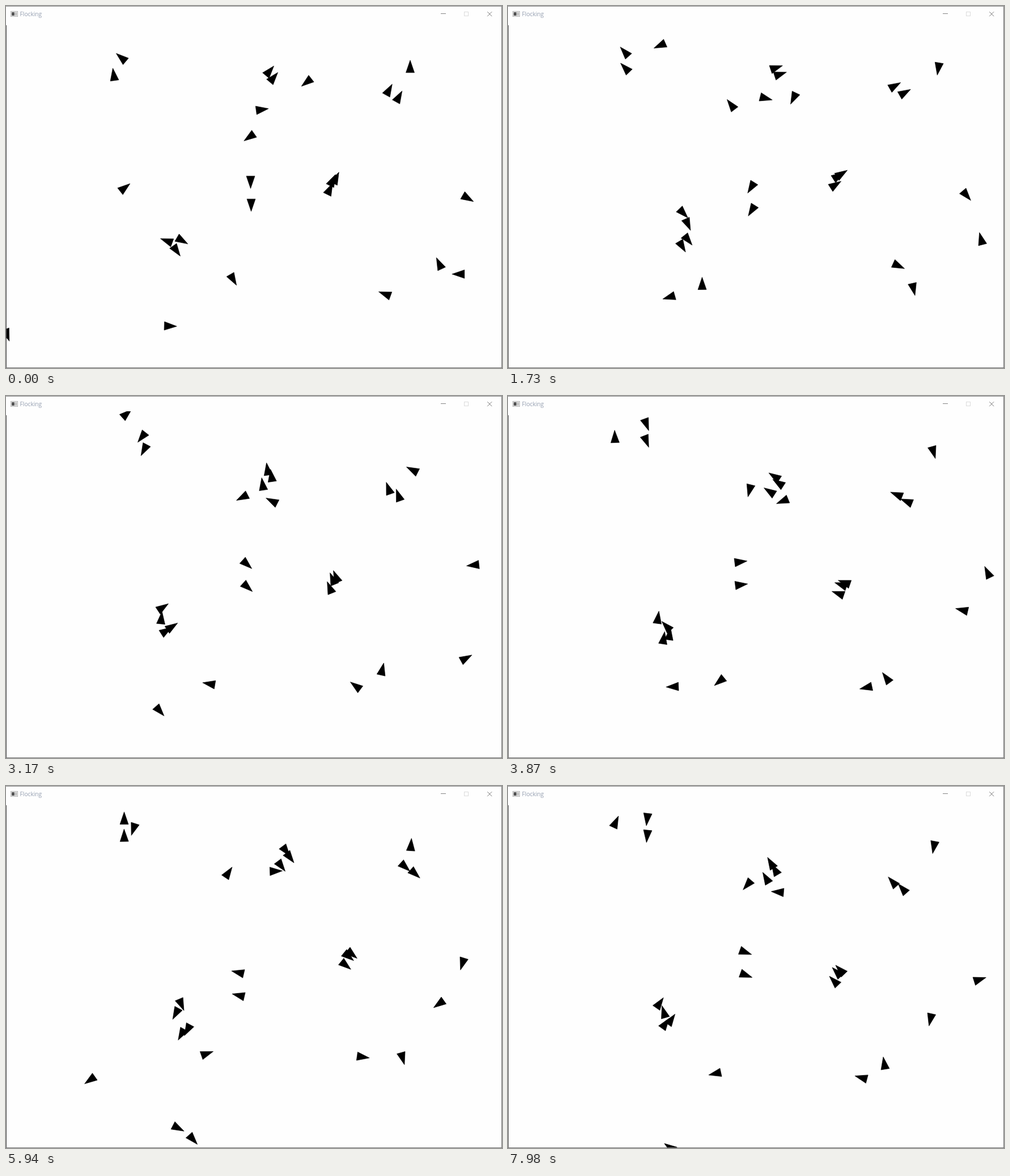
An HTML page for the animation above (8000 ms loop, 875 by 640 pixels).

```html
<!DOCTYPE html>
<html lang="en">
<head>
<meta charset="utf-8">
<title>Flocking</title>
<style>
  html, body { margin: 0; width: 100%; height: 100%; overflow: hidden; background: #fefefe; }
  svg { display: block; width: 875px; height: 640px; }
  text { font: 10.2px "Open Sans", "Noto Sans", sans-serif; fill: #929cae; }
</style>
</head>
<body>
<svg viewBox="0 0 875 640">
  <defs><clipPath id="view"><rect x="1" y="27" width="873" height="612"/></clipPath></defs>
  <rect width="875" height="640" fill="#fefefe"/>
  <g id="flock" clip-path="url(#view)" stroke="#000" stroke-width=".6"></g>
  <g fill="none" shape-rendering="crispEdges">
    <path d="M0 .5H875" stroke="#8a8a8a"/>
    <path d="M.5 34V640" stroke="#4c4c4c"/>
    <path d="M874.5 1V640M0 639.5H875" stroke="#767676"/>
    <path d="M767 13.5H776" stroke="#858585"/>
    <rect x="808.5" y="10.5" width="7" height="7" stroke="#dcdcdc"/>
    <rect x="8.5" y="9.5" width="12" height="9" stroke="#b4b4b4" fill="#eee"/>
    <rect x="10" y="11" width="5" height="6" fill="#555"/>
    <rect x="16" y="11" width="3" height="6" fill="#bbb"/>
  </g>
  <path d="M849.2 10.2l8 8m0-8l-8 8" stroke="#7c7c7c" fill="none"/>
  <text x="24.6" y="17.8">Flocking</text>
</svg>
<script>
const LOOP = 8000, START = 40;
const SPEED = 0.148;                // px per ms
const RADIUS = 18.5, RATE = 0.4445; // shared circle, degrees per ms
const DEG = Math.PI / 180;

// Moments at which a boid may change its course
const TIMES = [START, 1020, 2450, 3870, 4730, 5940, 7980];

// Headings run clockwise from north; a negative radius circles to the left
const orbit = (x, y, h, r) =>
  ({ x: x - r * Math.cos(h * DEG), y: y - r * Math.sin(h * DEG), h });

const mix = (a, b, k) => a + (b - a) * k;

const circle = (x, y, h, r = RADIUS, rate = RATE) =>
  t => orbit(x, y, h + rate * (t - START), r);

// A steady turn around a drifting centre, from one pose to the next
function swerve(a, b, t) {
  const span = b.t - a.t, k = (t - a.t) / span;
  const r = SPEED * span / ((b.h - a.h || 1) * DEG);
  const c = orbit(a.x, a.y, a.h, -r), d = orbit(b.x, b.y, b.h, -r);
  return orbit(mix(c.x, d.x, k), mix(c.y, d.y, k), mix(a.h, b.h, k), r);
}

function follow(keys, t) {
  const i = keys.findIndex(k => k.t > t);
  return i === 0 ? keys[0] : i < 0 ? keys[keys.length - 1] : swerve(keys[i - 1], keys[i], t);
}

const poses = (list, first = 0) =>
  list.map(([x, y, h], i) => ({ t: TIMES[first + i], x, y, h }));

const moment = (motion, i) => ({ t: TIMES[i], ...motion(TIMES[i]) });

// Boids that circle in step
const flock = (h, ...centres) => centres.map(([x, y]) => circle(x, y, h));

// Comes from elsewhere and settles into a circle
function join(home, arrival, ...list) {
  const keys = [...poses(list), moment(home, arrival)];
  return t => t < TIMES[arrival] ? follow(keys, t) : home(t);
}

// Breaks out of a circle
function leave(home, departure, ...list) {
  const keys = [moment(home, departure), ...poses(list, departure + 1)];
  return t => t < TIMES[departure] ? home(t) : follow(keys, t);
}

// Roams through poses, from the given moment on
function roam(first, ...list) {
  const keys = poses(list, first);
  return t => follow(keys, t);
}

const boids = [
  ...flock(180, [413, 311.5], [414, 352]),
  ...flock(26, [588, 331.5], [599, 312], [593, 316]),
  ...flock(29, [692, 157], [709.5, 169]),
  ...flock(40, [479.5, 126.5], [486.5, 138]),

  // alone
  circle(826, 321, 120, -22, -0.414),
  circle(603.5, -5, 556.6, -52, -0.182),
  circle(-45, 599, 160, 50, 0.15),

  // top left
  join(circle(207, 71, 95), 3, [235, -10, 405], [245, 34, 765], [245, 0, 1170]),
  join(circle(227, 57, -103), 3, [203, 91, -50]),
  join(circle(227, 87, -104), 2, [190, 121, -8]),

  // left
  join(circle(283, 394, 105), 3, [210, 321, 412], [319, 375, 540]),
  join(circle(292.5, 394, 54), 2, [283, 415, 290]),
  join(circle(293, 430.5, 106), 2, [301, 433, 145]),
  join(circle(303.5, 423, 105), 2, [311, 415, 120]),
  join(circle(361, 490.5, -32), 1, [401, 484, 150]),

  // top centre
  join(circle(471, 153, 40), 2, [530, 135, 592], [434, 126, 742]),
  join(circle(477, 169, -15), 2, [452, 183, 82], [429, 233, 595]),
  join(circle(408, 163, -69), 1, [429, 232, 235]),

  // right
  join(circle(733, 105, -99), 3, [713, 107, 360]),
  join(circle(682, 487, 61), 2, [764, 455, 695], [699, 468, 540]),
  join(circle(627.5, 497.5, -5), 2, [668, 509, 1010], [688, 529, 710]),
  join(circle(790, 423, 319, -46, -0.1973), 1, [798, 474, 270]),

  // bottom
  leave(circle(291, 540, 92, -26, -0.33), 4, [148, 520, -1565], [-40, 600, -1600]),
  roam(3, [275, 662, 0], [287, 587, 107], [304, 605, 477], [285, 638.5, 1025]),
  roam(0, [165, 672, -340], [197, 637, 20], [215, 675, 500], [235, 672, 930],
    [257, 633, 1130], [330, 625, 1578], [330, 680, 2300]),
];

const layer = document.getElementById("flock");
const shapes = boids.map(() => {
  const p = document.createElementNS("http://www.w3.org/2000/svg", "path");
  p.setAttribute("d", "M0-11.2L7.5 10.8H-7.5Z");
  return layer.appendChild(p);
});

function draw(time) {
  const t = Math.max(time % LOOP, START);
  boids.forEach((motion, i) => {
    const { x, y, h } = motion(t);
    shapes[i].setAttribute("transform",
      `translate(${x.toFixed(2)} ${y.toFixed(2)}) rotate(${h.toFixed(2)})`);
  });
}

const begin = performance.now();
function tick() {
  draw(performance.now() - begin);
  requestAnimationFrame(tick);
}
tick();
</script>
</body>
</html>
```
